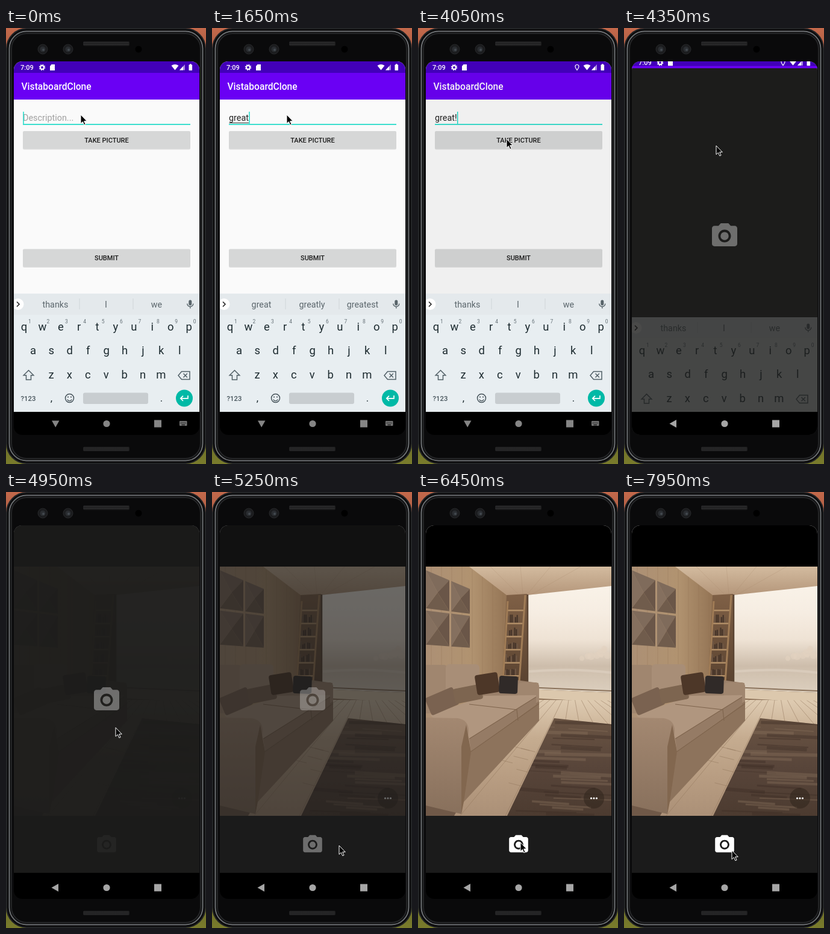
An HTML page for the animation above (8000 ms loop, 332 px wide and 719 px high).

```html
<!DOCTYPE html>
<html lang="en">
<head>
<meta charset="utf-8">
<style>
html, body { margin: 0; width: 100%; height: 100%; overflow: hidden; background: #111; }
svg { display: block; width: 332px; height: 719px; font-family: Roboto, sans-serif; }
.mid { text-anchor: middle; }
.med { font-weight: 500; }
</style>
</head>
<body>
<svg id="stage" viewBox="0 0 332 719"></svg>
<script>
const rect = (x, y, w, h, fill, more = '') =>
  `<rect x="${x}" y="${y}" width="${w}" height="${h}" fill="${fill}" ${more}/>`;
const poly = (points, fill, more = '') => `<polygon points="${points}" fill="${fill}" ${more}/>`;
const disc = (x, y, r, fill, more = '') => `<circle cx="${x}" cy="${y}" r="${r}" fill="${fill}" ${more}/>`;
const path = (d, fill, more = '') => `<path d="${d}" fill="${fill}" ${more}/>`;
const line = (d, color, width = 1, more = '') =>
  path(d, 'none', `stroke="${color}" stroke-width="${width}" ${more}`);
const text = (x, y, size, fill, str, more = '') =>
  `<text x="${x}" y="${y}" font-size="${size}" fill="${fill}" ${more}>${str}</text>`;
const clip = (id, shape) => `<clipPath id="${id}">${shape}</clipPath>`;
const clipped = (id, content) => `<g clip-path="url(#${id})">${content}</g>`;
const gradient = (id, colors, across = 0) =>
  `<linearGradient id="${id}" x2="${across}" y2="${1 - across}">${colors.split(' ').map((color, i, all) =>
    `<stop offset="${i / (all.length - 1)}" stop-color="${color}"/>`).join('')}</linearGradient>`;
const range = (n, fn) => Array.from({ length: n }, (_, i) => fn(i)).join('');

let seed = 7;
const random = (from, to) => from + (to - from) * ((seed = seed * 16807 % 2147483647) / 2147483647);

const cameraIcon = (y, scale, more = '') => `<g transform="translate(167 ${y}) scale(${scale}) translate(-12 -11)" fill="#fff" ${more}>
  <path d="M9 2L7.17 4H4c-1.1 0-2 .9-2 2v12c0 1.1.9 2 2 2h16c1.1 0 2-.9 2-2V6c0-1.1-.9-2-2-2h-3.17L15 2H9zm3 15c-2.76 0-5-2.24-5-5s2.24-5 5-5 5 2.24 5 5-2.24 5-5 5z"/>
  <circle cx="12" cy="12" r="3.2"/></g>`;

const grille = y => rect(128, y, 77, 7.5, '#1d1d1e', 'rx="2"') +
  line(`M129 ${y + 2.3}h75M129 ${y + 5.3}h75`, '#39393a', 1.6, 'stroke-dasharray="1.2 1"');
const lens = x => disc(x, 35, 8, '#1b1c1e', 'stroke="#27282a"') + disc(x, 35, 4.5, '#2a2d31') + disc(x + 1, 36, 2, '#43494f');
const rim = (inset, color, width) => rect(inset, inset, 332 - 2 * inset, 719 - 2 * inset, '#0a0a0b',
  `rx="${34 - inset}" stroke="${color}" stroke-width="${width}"`);

const phone = rect(0, 0, 332, 719, 'url(#desk)') +
  rim(1, '#232426', 2) + rim(5.5, '#6c6f72', 2) + rim(9, '#242527', 2) +
  grille(22) + grille(690.5) + lens(61) + lens(103) + disc(220, 35, 5.5, '#000');

const button = (id, y, label) => rect(28, y + 1, 278, 29.5, '#000', 'opacity=".12" rx="2"') +
  rect(28, y, 278, 29, '#d6d7d7', `id="${id}" rx="2"`) +
  text(167, y + 18.5, 11, '#1b1b1b', label, 'class="mid med"');

const app = rect(13, 55, 308, 580, '#fafafa') + rect(13, 73, 308, 45, '#6a00f4') +
  text(25.5, 102, 15.6, '#fff', 'VistaboardClone', 'class="med"') +
  text(28, 153, 14.4, '#a0a0a0', 'Description...', 'id="hint"') +
  text(28, 153, 14.4, '#222', '', 'id="field"') +
  rect(28.5, 156, 0, 1, '#333', 'id="composing"') +
  rect(28, 158.2, 278, 1.6, '#10d8c5') + rect(28, 138, 1.4, 20, '#10d8c5', 'id="caret"') +
  button('take', 170, 'TAKE PICTURE') + button('submit', 364.5, 'SUBMIT') +
  rect(13, 55, 308, 383, '#000', 'id="dim"');

const keyRow = (keys, x, y) => range(keys.length, i =>
  text(x + i * 30.4, y, 18.5, '#1d2b30', keys[i], 'class="mid"'));

const keyboard = rect(13, 438, 308, 195, '#e8eef1') + rect(13, 438, 308, 35, '#e4e9ec') +
  disc(20, 455.5, 9.5, '#fff') + line('M18 451.5l4 4-4 4', '#222', 1.6) +
  line('M122 446v18M211 446v18', '#cfd5d8') +
  range(3, i => text(82 + i * 84, 461, 14.3, '#5b666c', '', 'class="mid word"')) +
  rect(303.3, 448.5, 5, 9, '#58646a', 'rx="2.5"') +
  line('M300.8 454.5a5 5 0 0 0 10 0M305.8 459.5v3', '#58646a', 1.4) +
  keyRow('qwertyuiop', 30, 499) + keyRow('asdfghjkl', 45, 538) + keyRow('zxcvbnm', 75, 578) +
  range(10, i => text(39.5 + i * 30.4, 486.5, 8.5, '#667177', (i + 1) % 10, 'class="mid"')) +
  line('M37.5 564.5l8.3 8.3h-4.3v7.2h-8v-7.2h-4.3z', '#526067', 1.5) +
  line('M286 573l5.5-6.5h13.5v13h-13.5zM294.5 569.8l6.4 6.4m0-6.4l-6.4 6.4', '#526067', 1.5) +
  text(37, 615, 11.3, '#46535a', '?123', 'class="mid med"') +
  text(75.5, 616, 17, '#1d2b30', ',', 'class="mid"') + text(258, 616, 17, '#1d2b30', '.', 'class="mid"') +
  disc(105.5, 610.5, 7, 'none', 'stroke="#46535a" stroke-width="1.5"') +
  disc(103, 608.5, 1.1, '#46535a') + disc(108, 608.5, 1.1, '#46535a') +
  line('M101.7 612.5a4.2 4.2 0 0 0 7.6 0', '#46535a', 1.4) +
  rect(128, 601.5, 108, 18.5, '#c8cdd0', 'rx="3"') +
  disc(296, 610.5, 14, '#00b9a6') + line('M302 606v4.8h-12M294 606.6l-4.2 4.2 4.2 4.2', '#fff', 1.7);

// Padded wall tiles: four facets each, meeting at the centre; edges flatten towards eye level.
const tileEdge = (x, row) => [x, 129 + row * 70 - row * row * 3.5 + (x - 13) * .42 / (1 + row * 2.5)];
const tile = (col, row) => {
  const left = col ? 55 : 13, right = col ? 86 : 52;
  const corners = [tileEdge(left, row), tileEdge(right, row), tileEdge(right, row + .94), tileEdge(left, row + .94)];
  const centre = [0, 1].map(k => corners.reduce((sum, c) => sum + c[k] / 4, 0));
  return corners.map((c, i) => poly([c, corners[(i + 1) % 4], centre],
    ['#7f6b5b', '#6a5648', '#705c4c', '#85705f'][i])).join('');
};

const windowView = poly('181,170 321,155 321,331 181,325', 'url(#sky)') +
  range(9, () => disc(random(272, 318), random(256, 276), random(3, 7), '#e2d2c0', 'opacity=".6"')) +
  line('M184 296q70-6 137 2', '#d9cbbb', 4) + line('M181 322l140 6', '#8b735c', 2) +
  poly('181,325 321,331 321,347 190,340', '#dcc8ad');

const shelf = poly('147,170 181,168 181,325 140,318', 'url(#alcove)') +
  range(6, i => {
    const x = 149 - i * 1.4, y = 194 + i * 21.6;
    return range(7, k => {
      const height = i && random(7, 14);
      return rect(x + 2 + k * 2.8, y - height, 2.2, height, k % 3 ? '#46352a' : '#6d5644');
    }) + rect(x - 1, y, 27, 2.5, '#b08d66');
  }) + line('M149 180l-8 134M178 170l-10 144', '#a07c56', 3) + line('M182 169v153', '#5a4433', 2.5);

const floor = clipped('ground', rect(13, 342, 308, 192, 'url(#floor)') +
  range(12, i => line(`M255 312L${-80 + i * 75} 534`, '#8f755b', 1, 'opacity=".5"')) +
  range(9, () => line(`M${random(100, 200)} ${random(390, 520)}l24 6`, '#8f755b', 1, 'opacity=".5"')));

const rugShape = '226,373 321,383 321,534 148,534';
const rug = poly(rugShape, 'url(#rug)') + clipped('mat', range(30, i =>
  line(`M${random(140, 250)} ${380 + i * 5.2}l${random(50, 120)} ${random(2, 6)}`,
    Math.sin(i * .8) > .2 ? '#8a725d' : '#3a2b22', random(1, 6), 'opacity=".38"')));

const pillow = (x, y, w, h, tilt, fill) =>
  rect(x - w / 2, y - h / 2, w, h, fill, `rx="4" transform="rotate(${tilt} ${x} ${y})"`);

const sofa = poly('90,300 200,315 196,337 100,350', '#9a806a') +
  rect(5, 285, 44, 80, '#a0866f', 'rx="6"') + rect(46, 284, 56, 62, '#a88e77', 'rx="6"') +
  rect(166, 314, 35, 58, '#a0866f', 'rx="6"') +
  poly('80,425 201,345 201,377 76,511', '#8d735c') +
  poly('20,368 110,336 196,335 196,350 88,428', '#b0967f') +
  poly('85,407 196,338 196,350 88,428', '#957b65') +
  line('M85 350l79 9 2 18M85 407L196 338M88 428L201 349', '#7f654e', 1.2) +
  path('M13 372L66 373Q84 376 84 394L72 531 13 517Z', 'url(#arm)') +
  poly('80,384 88,428 76,511 72,531 72,420', '#82674f') +
  pillow(40, 345, 50, 31, -23, '#7a6250') + pillow(83, 333, 47, 25, -11, '#7d6550') +
  pillow(115, 316, 38, 33, -9, '#4d3728') + pillow(150, 318, 31, 29, 2, '#302a28');

const photo = rect(13, 123, 308, 411, 'url(#wall)') +
  range(8, i => line(`M${22 + i * 17} 123v217`, '#8a6d52', 1, 'opacity=".3"')) +
  poly('85,123 321,123 321,157 181,170 147,170', 'url(#ceiling)') +
  range(4, i => line(`M${120 + i * 50} 123L${166 + i * 8} 168`, '#a38567', 1, 'opacity=".25"')) +
  windowView + shelf + rect(13, 500, 80, 34, '#705948') + floor + rug +
  range(4, i => tile(i % 2, i >> 1)) + sofa;

const camera = rect(13, 55, 308, 580, '#000') + clipped('frame', photo) +
  disc(292, 505, 17, '#30251d', 'opacity=".55"') + range(3, i => disc(287.5 + i * 4.5, 505, 1.6, '#fff')) +
  rect(13, 534, 308, 95, '#1b1b1b') + cameraIcon(580, 1.58);

const status = rect(13, 54, 308, 20, '#4200b9') + rect(13, 70.5, 308, 3.5, '#6a00f4', 'id="strip"') +
  text(24, 69, 11, '#fff', '7:09', 'class="med"') +
  disc(60, 65, 2.9, 'none', 'stroke="#fff" stroke-width="2"') +
  disc(60, 65, 4.5, 'none', 'stroke="#fff" stroke-width="1.5" stroke-dasharray="1.8 1.73"') +
  poly('73,63 75.5,60 81,60 81,70 73,70', '#fff') + path('M274.5 62q6-4 12 0l-6 7.5z', '#fff') +
  poly('297,60 297,69.5 288,69.5', '#fff', 'opacity=".55"') + poly('294,63.2 294,69.5 288,69.5', '#fff') +
  rect(303.5, 60.5, 5.6, 9.5, '#fff', 'rx=".8"') + rect(305, 59.3, 2.6, 2, '#fff') +
  line('M264 69.5c-2-2.8-3-4.3-3-6a3 3 0 0 1 6 0c0 1.7-1 3.2-3 6z', '#fff', 1.2, 'id="pin"');

const nav = rect(13, 633, 308, 43, '#000', 'id="navBar"') +
  '<g id="navIcons"><path id="down" d="M76 647.5h12.5l-6.3 11z"/><path id="back" d="M87 646v13l-11.5-6.5z"/>' +
  '<circle cx="167" cy="652.5" r="5.6"/><rect x="246" y="646.5" width="12" height="12"/></g>' +
  '<g id="switch">' + rect(288, 648, 12.5, 8, '#777', 'rx="1"') +
  line('M289.5 650.3h10M289.5 652.4h10', '#000', 1, 'stroke-dasharray="1 1"') + line('M291.5 654.6h5.5', '#000') + '</g>';

stage.innerHTML = '<defs>' +
  gradient('desk', '#c4694b #4a3029 #2b2522 #35331c #7a7c2c') +
  gradient('wall', '#ac9075 #b19370 #8a6a4c #6d513a #6d513a', 1) +
  gradient('ceiling', '#d3bb9f #b4967a') + gradient('alcove', '#7f6046 #58412f') +
  gradient('sky', '#f9f2e8 #f6ede2 #efe3d5 #cdbdab #dccfbe') +
  gradient('floor', '#dfccb2 #c5ac90 #b89d82 #ab9077') +
  gradient('rug', '#6a5443 #58453a #4c3b30') + gradient('arm', '#a38871 #88705c') +
  clip('screen', rect(13, 55, 308, 616, '#000', 'rx="14"')) + clip('frame', rect(13, 123, 308, 411, '#000')) +
  clip('ground', poly('170,342 321,344 321,534 60,534', '#000')) + clip('mat', poly(rugShape, '#000')) + '</defs>' +
  phone + clipped('screen', `<g id="app">${app}</g><g id="camera">${camera}</g>
  ${rect(13, 55, 308, 580, '#1c1c1b', 'id="splash"')}
  <g id="keyboard">${keyboard}</g><g id="status">${status}</g>${cameraIcon(341, 2.1, 'id="logo"')}${nav}`) +
  path('M0 0v14.6l3.4-3.1 2.4 5.4 2.3-1-2.4-5.2h4.6z', '#000', 'id="pointer" stroke="#fff"');

const $ = id => document.getElementById(id);
const set = (id, attrs) => Object.entries(attrs).forEach(([name, value]) => $(id).setAttribute(name, value));
const words = document.querySelectorAll('.word');

const keyTimes = [450, 750, 1200, 1350, 1650, 2250];
const vocabulary = 'good go got great green grew greatly greatest'.split(' ');
const complete = typed => {
  const matches = vocabulary.filter(word => typed && word.startsWith(typed));
  return matches.length ? matches : ['thanks', 'I', 'we'];
};

// Each move: start, end, dx, dy.
const moves = [[2550, 3150, 23, 40], [4050, 4350, 6, 11], [4650, 5250, 58, 389], [5850, 6450, -41, -5], [7650, 7950, 9, 13]];
const ramp = (t, from, to) => Math.min(1, Math.max(0, (t - from) / (to - from)));

function draw(now) {
  const t = Math.floor(now % 8000 / 150) * 150;
  const typed = 'great!'.slice(0, keyTimes.filter(at => at <= t).length);
  $('field').textContent = typed;
  const width = typed ? $('field').getComputedTextLength() : 0;
  set('hint', { opacity: +!typed });
  set('composing', { width: typed.endsWith('!') ? 0 : Math.max(0, width - .5) });
  set('caret', { x: 28.3 + width });
  const completions = complete(typed);
  words.forEach((word, i) => word.textContent = completions[i]);

  const splash = ramp(t, 4050, 4300) - ramp(t, 4800, 5550) ** 2;
  set('take', { fill: t >= 3150 && t < 3450 ? '#c5c6c6' : '#d6d7d7' });
  set('dim', { opacity: .04 * ramp(t, 3600, 4050) });
  set('pin', { opacity: +(t >= 3750) });
  set('splash', { opacity: splash });
  set('logo', { opacity: .36 * Math.sqrt(splash) });
  set('keyboard', {
    opacity: t < 4500 ? 1 - .8 * splash : 0,
    transform: `translate(0 ${88 * ramp(t, 4050, 4500) ** 2})`
  });
  set('status', { transform: `translate(0 ${-22 * ramp(t, 4200, 4500) ** 1.5})` });

  const open = t >= 4350;
  set('strip', { opacity: +open });
  set('camera', { opacity: +(t >= 4500) });
  set('navBar', { y: t >= 4800 ? 628 : 633 });
  set('navIcons', { fill: open ? '#a6a6a6' : '#858585' });
  set('down', { opacity: +!open });
  set('back', { opacity: +open });
  set('switch', { opacity: +!open });

  const position = moves.reduce(([x, y], [from, to, dx, dy]) =>
    [x + dx * ramp(t, from, to), y + dy * ramp(t, from, to)], [124, 143]);
  set('pointer', { transform: `translate(${position})` });
}

const start = performance.now();
(function loop() {
  draw(performance.now() - start);
  requestAnimationFrame(loop);
})();
</script>
</body>
</html>
```
